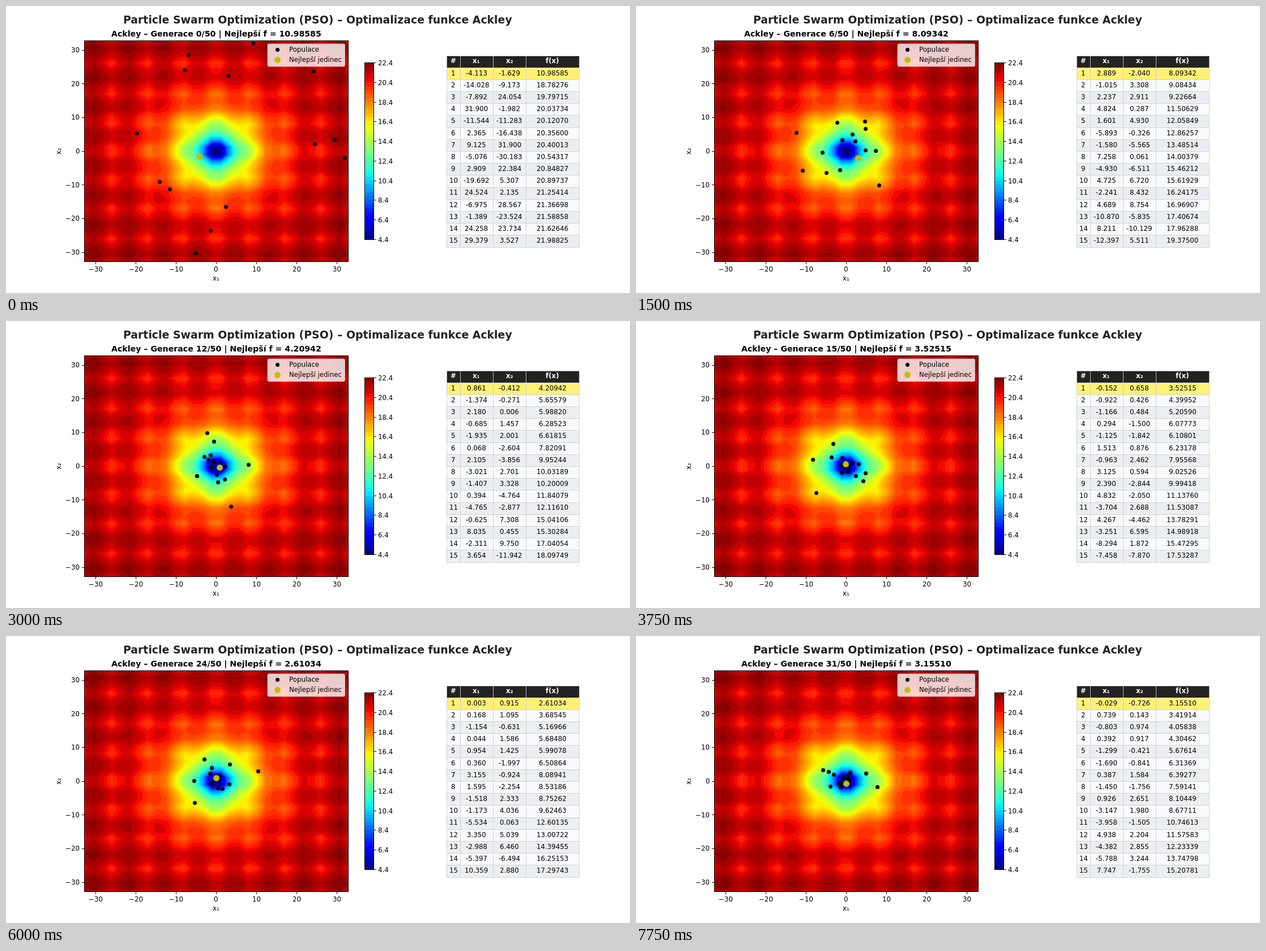
An HTML page with a canvas for the animation above (8 s loop, 1102 px wide and 508 px high).

```html
<!DOCTYPE html>
<html lang="cs">
<head>
<meta charset="utf-8">
<title>PSO – Ackley</title>
<style>
  html, body { margin: 0; width: 100%; height: 100%; overflow: hidden; background: #fff; }
  canvas { display: block; }
</style>
</head>
<body>
<canvas id="stage" width="1102" height="508"></canvas>
<script>
const W = 1102, H = 508, STEP = 250, STEPS = 32, SIZE = 15;
const ctx = document.getElementById('stage').getContext('2d');
const LIM = 32.768, NODES = 30;
const LOW = 4.4, BAND = 0.4, BANDS = 45;
const PT = 85 / 72;
const plot = { l: 138, t: 61, r: 604, b: 452 };
const X = v => 371.1 + v * 7.103;
const Y = v => 256.6 - v * 5.967;
const lerp = (a, b, u) => a + (b - a) * u;

function ackley(x, y) {
  const t = 2 * Math.PI;
  return 20 + Math.E - 20 * Math.exp(-0.2 * Math.sqrt((x * x + y * y) / 2))
    - Math.exp((Math.cos(t * x) + Math.cos(t * y)) / 2);
}

// ---------- swarm ----------

// generation, best x, best y, best f, inner and outer radius of the rest
const KEYS = [
  [0, -4.113, -1.629, 10.98585, 16, 38],
  [3, 4.951, 1.982, 10.66428, 5, 15],
  [10, -0.414, -1.063, 4.6656, 1.8, 12.5],
  [15, -0.152, 0.658, 3.52515, 1.1, 10],
  [20, -0.172, -0.521, 3.44112, 1.4, 9.7],
  [24, 0.003, 0.915, 2.61034, 1.1, 10],
  [31, -0.029, -0.726, 3.1551, 0.8, 8.4]
].map(([gen, x, y, f, near, far]) => ({ gen, r: Math.hypot(x, y), a: Math.atan2(y, x), f, near, far }));

function stateAt(gen) {
  const i = Math.max(1, KEYS.findIndex(k => k.gen >= gen));
  const p = KEYS[i - 1], q = KEYS[i], u = (gen - p.gen) / (q.gen - p.gen);
  return Object.fromEntries(Object.keys(p).map(k => [k, lerp(p[k], q[k], u)]));
}

function randomizer(seed) {
  return () => {
    seed = (seed + 0x6D2B79F5) | 0;
    let t = Math.imul(seed ^ (seed >>> 15), seed | 1);
    t ^= t + Math.imul(t ^ (t >>> 7), t | 61);
    return ((t ^ (t >>> 14)) >>> 0) / 4294967296;
  };
}

// The rest scatter on widening rings, always worse than the best one.
function population(gen) {
  const s = stateAt(gen), rand = randomizer(gen * 97 + 5);
  const clamp = v => Math.max(-31.9, Math.min(31.9, v));
  const rest = Array.from({ length: SIZE - 1 }, (_, i) => {
    let x, y, f;
    do {
      const r = s.near * (s.far / s.near) ** (i / (SIZE - 2)) * lerp(0.9, 1.1, rand());
      const a = rand() * 2 * Math.PI;
      x = clamp(r * Math.cos(a));
      y = clamp(r * Math.sin(a));
      f = ackley(x, y);
    } while (f <= s.f);
    return { x, y, f };
  }).sort((p, q) => p.f - q.f);
  return [{ x: s.r * Math.cos(s.a), y: s.r * Math.sin(s.a), f: s.f }, ...rest];
}

// ---------- drawing helpers ----------

const SHIFT = { left: 0, center: 0.5, right: 1 };

// Text starts on whole pixels.
function label(c, text, x, y, { pt = 10, bold = false, align = 'center', color = '#000' } = {}) {
  c.font = `${bold ? 'bold ' : ''}${pt * PT}px "DejaVu Sans", sans-serif`;
  c.fillStyle = color;
  c.fillText(text, Math.round(x - c.measureText(text).width * SHIFT[align]), Math.round(y));
}

function dot(c, x, y, r, color) {
  c.fillStyle = color;
  c.beginPath();
  c.arc(Math.round(x) + 0.5, Math.round(y) + 0.5, r, 0, 2 * Math.PI);
  c.fill();
}
const member = (c, x, y) => dot(c, x, y, 3.5, '#000');
const leader = (c, x, y) => dot(c, x, y, 5.4, '#bfbf00');

function ramp(t, stops) {
  for (let i = 1; i < stops.length; i++) {
    const [a, u] = stops[i - 1], [b, v] = stops[i];
    if (t <= b) return Math.round(255 * lerp(u, v, (t - a) / (b - a)));
  }
}

function jet(t) {
  return [
    ramp(t, [[0, 0], [0.35, 0], [0.66, 1], [0.89, 1], [1, 0.5]]),
    ramp(t, [[0, 0], [0.125, 0], [0.375, 1], [0.64, 1], [0.91, 0], [1, 0]]),
    ramp(t, [[0, 0.5], [0.11, 1], [0.34, 1], [0.65, 0], [1, 0]])
  ];
}
const palette = Array.from({ length: BANDS }, (_, i) => jet(Math.floor((i + 0.5) / BANDS * 256) / 255));

// ---------- filled contours ----------

// Parts of a grid cell that lie above a level.
function above(cell, level) {
  const up = cell.map(p => p.z >= level), path = [];
  cell.forEach((a, i) => {
    const b = cell[(i + 1) % 4];
    if (up[i]) path.push(a);
    if (up[i] !== up[(i + 1) % 4]) {
      const k = (level - a.z) / (b.z - a.z);
      path.push({ x: lerp(a.x, b.x, k), y: lerp(a.y, b.y, k) });
    }
  });
  const mean = cell.reduce((s, p) => s + p.z, 0) / 4;
  if (path.length < 6 || mean >= level) return [path];
  if (up[0]) path.unshift(path.pop());
  return [path.slice(0, 3), path.slice(3)];
}

function contains(path, x, y) {
  let inside = false;
  for (let i = 0, j = path.length - 1; i < path.length; j = i++) {
    const a = path[i], b = path[j];
    if ((a.y > y) !== (b.y > y) && x < a.x + (b.x - a.x) * (y - a.y) / (b.y - a.y)) inside = !inside;
  }
  return inside;
}

function contours(c) {
  const w = plot.r - plot.l, h = plot.b - plot.t;
  const img = c.createImageData(w, h);
  const node = i => -LIM + i * 2 * LIM / (NODES - 1);
  const corner = (i, j) => ({ x: X(node(i)), y: Y(node(j)), z: ackley(node(i), node(j)) });
  for (let j = 0; j < NODES - 1; j++) for (let i = 0; i < NODES - 1; i++) {
    const cell = [corner(i, j), corner(i + 1, j), corner(i + 1, j + 1), corner(i, j + 1)];
    const zs = cell.map(p => p.z), top = Math.max(...zs);
    const base = Math.floor((Math.min(...zs) - LOW) / BAND);
    const regions = [];
    for (let k = base + 1; LOW + BAND * k < top; k++) regions.push(above(cell, LOW + BAND * k));
    const x1 = Math.round(cell[1].x), y1 = Math.round(cell[0].y);
    for (let y = Math.round(cell[2].y); y < y1; y++) for (let x = Math.round(cell[0].x); x < x1; x++) {
      let n = 0;
      while (n < regions.length && regions[n].some(p => contains(p, x + 0.5, y + 0.5))) n++;
      const rgb = palette[Math.min(BANDS - 1, base + n)];
      img.data.set([...rgb, 255], ((y - plot.t) * w + x - plot.l) * 4);
    }
  }
  c.putImageData(img, plot.l, plot.t);
}

// ---------- static layers ----------

function layer(paint) {
  const cv = document.createElement('canvas');
  cv.width = W;
  cv.height = H;
  paint(cv.getContext('2d'));
  return cv;
}

const TABLE = { left: 778.4, top: 87.5, width: 233.2, row: 21.19 };
const cols = [0, 0.1, 0.35, 0.6, 1].map(k => TABLE.left + TABLE.width * k);
const mid = i => (cols[i] + cols[i + 1]) / 2;
const rowTop = r => Math.round(TABLE.top + TABLE.row * r);
const rowBase = r => TABLE.top + TABLE.row * (r + 0.5) + 3.3;

function table(c) {
  c.strokeStyle = '#ccc';
  c.lineWidth = 0.8;
  for (let r = 0; r <= SIZE; r++) {
    c.fillStyle = r === 0 ? '#222' : r === 1 ? '#fff176' : r % 2 ? '#eceff1' : '#fafafa';
    for (let i = 0; i < 4; i++) {
      const x = Math.round(cols[i]);
      const box = [x + 0.5, rowTop(r) + 0.5, Math.round(cols[i + 1]) - x, rowTop(r + 1) - rowTop(r)];
      c.fillRect(...box);
      c.strokeRect(...box);
    }
    if (r) label(c, r, mid(0), rowBase(r));
  }
  ['#', 'x₁', 'x₂', 'f(x)'].forEach((t, i) => label(c, t, mid(i), rowBase(0), { bold: true, color: '#fff' }));
}

function colorbar(c) {
  const x = 633, w = 16, top = 100, h = 313;
  const level = k => Math.round(top + h * (1 - k));
  palette.forEach((rgb, i) => {
    const y = level((i + 1) / BANDS);
    c.fillStyle = `rgb(${rgb})`;
    c.fillRect(x, y, w, level(i / BANDS) - y);
  });
  c.strokeStyle = '#000';
  c.lineWidth = 1;
  c.strokeRect(x + 0.5, top + 0.5, w, h);
  for (let i = 0; i < 10; i++) {
    const y = level(i / 9);
    c.fillStyle = '#000';
    c.fillRect(x + w + 1, y, 4, 1);
    label(c, (LOW + 2 * i).toFixed(1), 657, y + 4.5, { align: 'left' });
  }
}

const back = layer(c => {
  c.fillStyle = '#fff';
  c.fillRect(0, 0, W, H);
  contours(c);
  colorbar(c);
  table(c);
  label(c, 'Particle Swarm Optimization (PSO) – Optimalizace funkce Ackley', 550.8, 31,
    { pt: 16, bold: true, color: '#222' });
  for (let v = -30; v <= 30; v += 10) {
    const text = String(v).replace('-', '−');
    c.fillStyle = '#000';
    c.fillRect(Math.round(X(v)), 453, 1, 4);
    c.fillRect(134, Math.round(Y(v)), 4, 1);
    label(c, text, X(v), 470);
    label(c, text, 130.1, Y(v) + 4.4, { align: 'right' });
  }
  label(c, 'x₁', 371, 486);
  c.save();
  c.translate(97, 257);
  c.rotate(-Math.PI / 2);
  label(c, 'x₂', 0, 0);
  c.restore();
});

const front = layer(c => {
  c.strokeStyle = '#000';
  c.lineWidth = 1;
  c.strokeRect(plot.l + 0.5, plot.t + 0.5, plot.r - plot.l, plot.b - plot.t);
  c.beginPath();
  c.roundRect(462, 67, 136.5, 40, 2.4);
  c.fillStyle = 'rgba(255,255,255,.8)';
  c.fill();
  c.strokeStyle = 'rgba(204,204,204,.8)';
  c.stroke();
  member(c, 479, 77.4);
  leader(c, 479, 95);
  label(c, 'Populace', 500, 81, { align: 'left' });
  label(c, 'Nejlepší jedinec', 500, 99, { align: 'left' });
});

// ---------- animation ----------

const runs = Array.from({ length: STEPS }, (_, g) => population(g));

function draw(gen) {
  const swarm = runs[gen], best = swarm[0];
  ctx.drawImage(back, 0, 0);
  ctx.save();
  ctx.beginPath();
  ctx.rect(plot.l, plot.t, plot.r - plot.l, plot.b - plot.t);
  ctx.clip();
  swarm.forEach(p => member(ctx, X(p.x), Y(p.y)));
  leader(ctx, X(best.x), Y(best.y));
  ctx.restore();
  ctx.drawImage(front, 0, 0);
  label(ctx, `Ackley – Generace ${gen}/50 | Nejlepší f = ${best.f.toFixed(5)}`, 371.1, 54, { pt: 12, bold: true });
  swarm.forEach((p, i) => {
    [p.x.toFixed(3), p.y.toFixed(3), p.f.toFixed(5)].forEach((t, k) => label(ctx, t, mid(k + 1), rowBase(i + 1)));
  });
}

const start = performance.now();
function tick() {
  draw(Math.floor((performance.now() - start) / STEP) % STEPS);
  requestAnimationFrame(tick);
}
draw(0);
requestAnimationFrame(tick);
</script>
</body>
</html>
```
